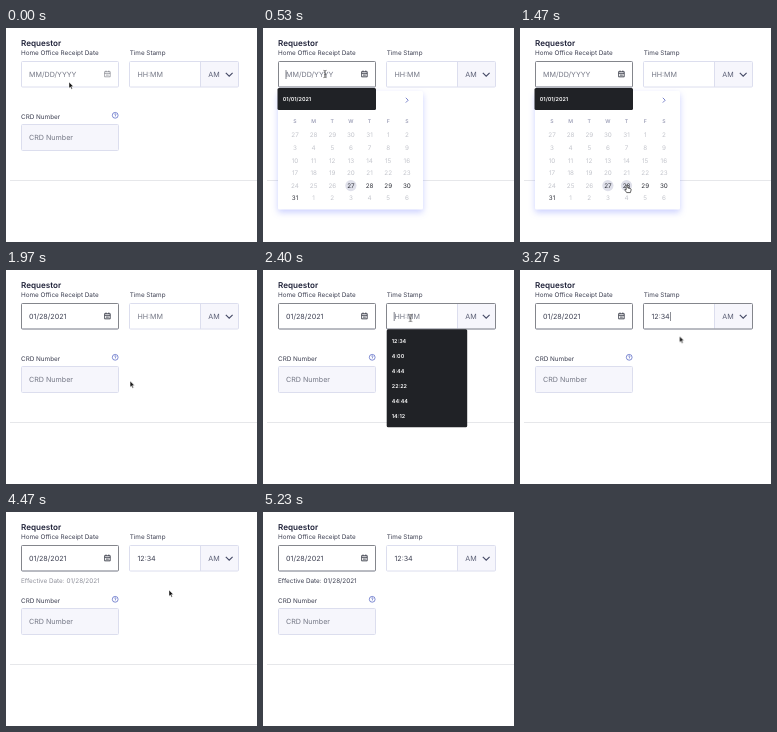
Recreate the animation shown at these times as an HTML page. Size 251 by 214 pixels, loop 6110 ms.

```html
<!DOCTYPE html>
<html lang="en">
<head>
<meta charset="utf-8">
<title>Requestor form</title>
<style>
html, body { margin: 0; width: 100%; height: 100%; overflow: hidden; background: #fff; }
svg { display: block; width: 251px; height: 214px; font-family: Inter, "Open Sans", sans-serif; text-rendering: geometricPrecision; }
.title { font-size: 8.1px; font-weight: 600; fill: #20233a; }
.label { font-size: 6.35px; fill: #3b3e50; }
.input { font-size: 7.15px; fill: #757886; }
.input.value { fill: #3f4254; }
.input.period { fill: #5c6076; }
.box { fill: none; stroke: #dcdeee; stroke-width: 1; }
.dark { stroke: #84868c; }
.tint { fill: #f6f6fc; }
.icon { fill: none; stroke: #454854; stroke-width: .7; }
.caret { stroke: #4a4c58; stroke-width: .7; }
.menu { fill: #202226; }
.menu-text { font-size: 5.4px; font-weight: 600; fill: #fff; }
.panel { fill: #fff; filter: drop-shadow(0 3px 3px rgba(86, 104, 255, .3)); }
#days { font-size: 6.3px; text-anchor: middle; fill: #c3c5cc; }
#days .head { font-size: 5.2px; font-weight: 500; fill: #9093ae; }
#days .open { fill: #30323b; }

/* One shared clock: 1% is 61.1 ms */
.a { animation: 6110ms step-end infinite; }
.smooth { animation-timing-function: linear; }
.date-focus { animation-name: date-focus; }
.date-empty { animation-name: date-empty; }
.date-value { animation-name: date-value; }
.date-caret { animation-name: date-caret; }
.date-menu { animation-name: date-menu; }
.calendar { animation-name: calendar; }
.hover { animation-name: hover; }
.time-focus { animation-name: time-focus; }
.time-empty { animation-name: time-empty; }
.time-value { animation-name: time-value; }
.caret-start { animation-name: caret-start; }
.caret-end { animation-name: caret-end; }
.time-menu { animation-name: time-menu; }
.row { animation-name: row; }
.loader { animation-name: loader; }
.spin { animation-name: spin; }
.result { animation-name: result; }
.pointer { animation-name: pointer; animation-timing-function: ease-in-out; }
.arrow { animation-name: arrow; }
.beam { animation-name: beam; }
.hand { animation-name: hand; }

@keyframes date-focus { 0% { opacity: 0 } 4.9% { opacity: 1 } }
@keyframes date-empty { 0% { opacity: 1 } 27.8%, 100% { opacity: 0 } }
@keyframes date-value { 0% { opacity: 0 } 27.8% { opacity: 1 } }
@keyframes date-caret { 0% { opacity: 0 } 5.4% { opacity: 1 } 14.8%, 100% { opacity: 0 } }
@keyframes date-menu { 0% { opacity: 0 } 6% { opacity: 1 } 27.8%, 100% { opacity: 0 } }
@keyframes calendar { 0%, 5.4% { opacity: 0 } 8.4%, 27.8% { opacity: 1 } 30.3%, 100% { opacity: 0 } }
@keyframes hover { 0% { opacity: 0 } 21.4% { opacity: 1 } 28.8%, 100% { opacity: 0 } }
@keyframes time-focus { 0% { opacity: 0 } 38.1% { opacity: 1 } 59.4%, 100% { opacity: 0 } }
@keyframes time-empty { 0% { opacity: 1 } 42.5%, 100% { opacity: 0 } }
@keyframes time-value { 0% { opacity: 0 } 42.5% { opacity: 1 } }
@keyframes caret-start { 0% { opacity: 0 } 38.1% { opacity: 1 } 42.5%, 100% { opacity: 0 } }
@keyframes caret-end { 0% { opacity: 0 } 43.7% { opacity: 1 } 59.4%, 100% { opacity: 0 } }
@keyframes time-menu { 0%, 38.4% { opacity: 0 } 39%, 43.7% { opacity: 1 } 45.2%, 100% { opacity: 0 } }
@keyframes row { 0% { opacity: 0 } 42.5% { opacity: 1 } 45.3%, 100% { opacity: 0 } }
@keyframes loader { 0% { opacity: 0 } 59.4% { opacity: 1 } 69.8%, 100% { opacity: 0 } }
@keyframes spin { 0%, 59.4% { transform: rotate(-59deg) } 69.9%, 100% { transform: rotate(301deg) } }
@keyframes result { 0%, 69.8% { opacity: 0 } 75.7%, 100% { opacity: 1 } }
@keyframes pointer {
  0%, 3.2% { transform: translate(63px, 54px) }
  8.4%, 11.9% { transform: translate(62px, 46px) }
  21.8%, 22.4% { transform: translate(106.5px, 156px) }
  23.8%, 27.8% { transform: translate(107px, 157px) }
  37.6%, 48.6% { transform: translate(147.5px, 48px) }
  53.5% { transform: translate(159.5px, 66px); animation-timing-function: ease-out }
  58.4%, 84.2% { transform: translate(163px, 78px); animation-timing-function: linear }
  85.3%, 100% { transform: translate(218px, 54px) }
}
@keyframes arrow {
  0% { opacity: 1 } 4.9% { opacity: 0 } 14.6% { opacity: 1 } 22.6% { opacity: 0 }
  28.8% { opacity: 1 } 35.3% { opacity: 0 } 51.6% { opacity: 1 } 85.3%, 100% { opacity: 0 }
}
@keyframes beam {
  0% { opacity: 0 } 4.9% { opacity: 1 } 14.6% { opacity: 0 }
  35.3% { opacity: 1 } 51.6%, 100% { opacity: 0 }
}
@keyframes hand { 0% { opacity: 0 } 22.6% { opacity: 1 } 28.8%, 100% { opacity: 0 } }
</style>
</head>
<body>
<svg viewBox="0 0 251 214">
  <path d="M4 152.5H251" stroke="#e6e7ea"/>

  <text class="title" x="15" y="17.6">Requestor</text>
  <text class="label" x="15" y="27.2">Home Office Receipt Date</text>
  <text class="label" x="123.7" y="27.2">Time Stamp</text>
  <text class="label" x="15" y="90.7">CRD Number</text>

  <!-- Date field -->
  <rect class="box" x="15.5" y="33.5" width="97" height="25.5" rx="1"/>
  <rect class="box dark a date-focus" x="15.5" y="33.5" width="97" height="25.5" rx="1"/>
  <text class="input a date-empty" x="23" y="49">MM/DD/YYYY</text>
  <text class="input value a date-value" x="23" y="49">01/28/2021</text>
  <path class="caret a date-caret" d="M23 42V51"/>
  <g class="icon" opacity=".65"><path id="cal" d="M98.6 43.7H104.2V48.8H98.6ZM98.6 45.4H104.2M100 42.6V44M102.8 42.6V44M100 47.1H102.8"/></g>
  <g class="icon a date-focus"><use href="#cal"/></g>

  <!-- Time field -->
  <path class="tint" d="M194 33.5H232.5V59H194Z"/>
  <path class="box" d="M194.5 33.5V59"/>
  <rect class="box" x="123.5" y="33.5" width="109" height="25.5" rx="1"/>
  <rect class="box dark a time-focus" x="123.5" y="33.5" width="109" height="25.5" rx="1"/>
  <text class="input a time-empty" x="131.4" y="49">HH:MM</text>
  <text class="input value a time-value" x="131.4" y="49">12:34</text>
  <path class="caret a caret-start" d="M131.2 42V51"/>
  <path class="caret a caret-end" d="M150.4 42V51"/>
  <text class="input period" x="202.3" y="49">AM</text>
  <path d="M219.8 44.9L223.2 48.2L226.6 44.9" fill="none" stroke="#454a66" stroke-width="1.15"/>

  <!-- Effective date -->
  <g transform="translate(21.3 67.8)">
    <g class="a loader"><circle class="a smooth spin" r="4" pathLength="360" fill="none" stroke="#3056e0" stroke-width="1.2" stroke-dasharray="80 280"/></g>
  </g>
  <text class="label a smooth result" x="15" y="70.6">Effective Date: 01/28/2021</text>

  <!-- CRD field -->
  <rect class="tint" x="15.5" y="96.5" width="97" height="26" rx="1"/>
  <rect class="box" x="15.5" y="96.5" width="97" height="26" rx="1"/>
  <text class="input" x="23" y="112.4">CRD Number</text>
  <circle cx="109.2" cy="87.3" r="2.9" fill="none" stroke="#5868c4" stroke-width=".75"/>
  <text x="109.2" y="89.1" font-size="4.8" font-weight="600" text-anchor="middle" fill="#5868c4">?</text>

  <!-- Calendar -->
  <g class="a smooth calendar">
    <rect class="panel" x="15" y="63" width="145" height="118.5" rx="1.5"/>
    <path d="M142.8 69.8L145.2 72.2L142.8 74.6" fill="none" stroke="#6a74c4" stroke-width=".9"/>
    <circle cx="87.9" cy="157.6" r="5.6" fill="#dfe0ea"/>
    <circle class="a hover" cx="106.5" cy="157.6" r="5.6" fill="#dfe0ea"/>
    <g id="days"></g>
  </g>
  <g class="a date-menu">
    <rect class="menu" x="14.5" y="60" width="98.5" height="22" rx="1.5"/>
    <text class="menu-text" x="19.8" y="72.9">01/01/2021</text>
  </g>

  <!-- Time suggestions -->
  <g class="a smooth time-menu">
    <rect class="menu" x="123.7" y="59.3" width="80.5" height="98" rx="1.5"/>
    <rect class="a row" x="123.7" y="63.5" width="80.5" height="15" fill="#46484d"/>
    <g id="times" class="menu-text"></g>
  </g>

  <!-- Pointer -->
  <g class="a pointer">
    <path class="a arrow" d="M0 0V6.2L1.4 5L2.4 7.2L3.4 6.8L2.5 4.6H4.4Z" fill="#111" stroke="#fff" stroke-width=".5"/>
    <path class="a beam" d="M-1.5 -3.6Q0 -3.6 0 -2.6Q0 -3.6 1.5 -3.6M0 -2.6V2.6M-1.5 3.6Q0 3.6 0 2.6Q0 3.6 1.5 3.6M-.8 .8H.8" fill="none" stroke="#333" stroke-width=".7"/>
    <path class="a hand" d="M-.8 .4Q0 -.6 .8 .4V3L3.6 3.6Q4.3 3.9 4.1 5L3.4 7.6H-.3L-2.3 4.8Q-2.2 3.8 -.8 4.8Z" fill="#fff" stroke="#222" stroke-width=".7"/>
  </g>
</svg>
<script>
function addText(parent, x, y, text, cls = "") {
  const el = document.createElementNS("http://www.w3.org/2000/svg", "text");
  el.setAttribute("x", x);
  el.setAttribute("y", y);
  el.setAttribute("class", cls);
  el.textContent = text;
  parent.append(el);
}

const days = document.getElementById("days");
const columnX = i => 32 + i * 18.64;
[..."SMTWTFS"].forEach((name, i) => addText(days, columnX(i), 94.8, name, "head"));

for (let i = 0; i < 42; i++) {
  const date = new Date(2020, 11, 27 + i);
  const open = date.getMonth() === 0 && date.getDate() >= 27;
  const y = 109.4 + Math.floor(i / 7) * 12.6;
  addText(days, columnX(i % 7), y, date.getDate(), open ? "open" : "");
}

const times = document.getElementById("times");
["12:34", "4:00", "4:44", "22:22", "44:44", "14:12"]
  .forEach((time, i) => addText(times, 128.8, 73 + i * 15.05, time));
</script>
</body>
</html>
```
